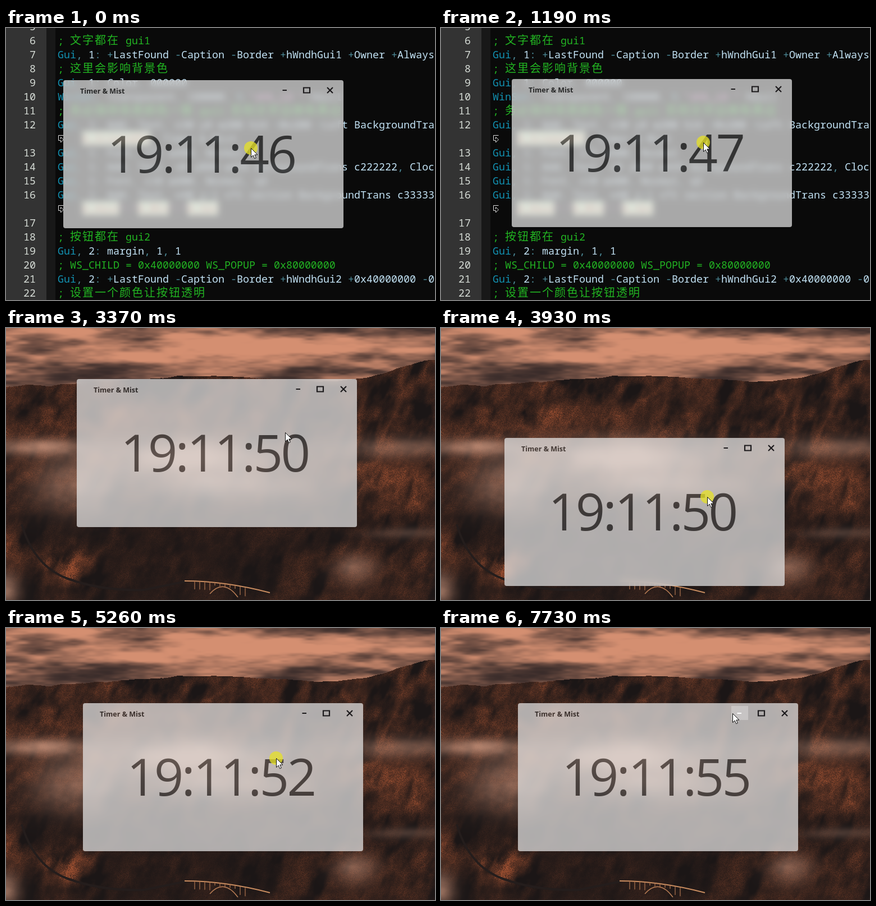
Animation, 764 px wide and 485 px high, one loop 7.99 s. Source, as an HTML page with a canvas:

```html
<!DOCTYPE html>
<html lang="en">
<head>
<meta charset="utf-8">
<title>Timer</title>
<style>
html, body { margin: 0; width: 100%; height: 100%; overflow: hidden; background: #0a0a0a; }
#stage { position: relative; width: 764px; height: 485px; overflow: hidden; }
#stage > * { position: absolute; left: 0; top: 0; }
#editor { width: 764px; height: 485px; overflow: hidden; transform-origin: 50% 100%;
  background: linear-gradient(90deg, #333 72px, #181818 72px 88px, #0a0a0a 88px);
  font: 18.33px/25px "Noto Sans Mono", "DejaVu Sans Mono", monospace; }
#editor div { position: absolute; white-space: pre; height: 25px; }
.num { width: 53px; text-align: right; color: #d6dcd6; }
.row { left: 92px; color: #c2e2f4; }
.note { color: #22b422; }
.cmd { color: #1290b0; }
.op { color: #4d8c9a; }
.str { color: #d070c0; }
.var { color: #c03a30; background: #c8e0bc; }
.cjk { font: 20px/0 "Noto Sans CJK SC", "Noto Sans CJK", sans-serif; letter-spacing: 2px; }
.wrap { position: absolute; left: 92px; }
#win { width: 499px; height: 264px; border-radius: 4px; overflow: hidden;
  backdrop-filter: blur(6px); }
#win svg { display: block; }
#win text { font-family: "Open Sans", "Noto Sans", sans-serif; }
</style>
</head>
<body>
<div id="stage">
  <canvas id="photo" width="764" height="485"></canvas>
  <div id="editor"></div>
  <div id="win">
    <svg width="499" height="264">
      <g opacity=".72">
        <rect width="499" height="264" fill="#e6e6e6"/>
        <text x="30" y="23.5" font-size="12.5" font-weight="700" fill="#303030">Timer &amp; Mist</text>
        <text id="clock" x="78" y="165" font-size="92" letter-spacing="-3.8" fill="#444"></text>
      </g>
      <g class="btn"><rect x="380" y="5" width="30" height="25"/><path d="M390.500 18H398"/></g>
      <g class="btn"><rect x="418" y="5" width="30" height="25"/><path d="M428 13.500H439V22.500H428Z"/></g>
      <g class="btn"><rect x="460" y="5" width="30" height="25"/><path d="M470 13L480 23M480 13L470 23"/></g>
    </svg>
  </div>
  <svg id="cursor" width="48" height="48" viewBox="-24 -24 48 48">
    <circle id="press" r="12" fill="#e6e128" fill-opacity=".76"/>
    <path d="M.5 .5V16.500L4.200 13L6.700 18.700L9.300 17.600L6.800 12H12Z" fill="#fff" stroke="#111"/>
  </svg>
</div>
<script>
const $ = id => document.getElementById(id);
const LOOP = 7990, STEP = 70;
const clamp = u => Math.min(1, Math.max(0, u));
const mix = (a, b, k) => a + (b - a) * k;
const blend = (p, q, k) => p.map((v, i) => mix(v, q[i], k));
const ease = (t, a, b) => {
  const u = clamp((t - a) / (b - a));
  return u * u * (3 - 2 * u);
};

// Editor lines; an indented line is a wrapped one without a number.
const LINES = `
; 文字都在 gui1
Gui, 1: +LastFound -Caption -Border +hWndhGui1 +Owner +AlwaysOnTop
; 这里会影响背景色
Gui, 1: Color, 000000
WinSet, Transparent, 180000, % "ahk_id " hGui1
; 务必保持背景颜色一致 gui1 否则文字边缘有黑边
Gui, 1: Add, Text, x30 y8 w200 h24 +0x200 +Left BackgroundTrans c333333
    A_ScreenDPI, Timer & Mist
Gui, 1: Font, s72 w400, Normal
Gui, 1: Add, Text, x0 y080 w499 BackgroundTrans c222222, Clock
Gui, 1: Font, s10 w400, Normal, q5
Gui, 1: Add, Text, x40 y+1 vTt section BackgroundTrans c333333, %
    A_Hour":"A_Min":"A_Sec

; 按钮都在 gui2
Gui, 2: margin, 1, 1
; WS_CHILD = 0x40000000 WS_POPUP = 0x80000000
Gui, 2: +LastFound -Caption -Border +hWndhGui2 +0x40000000 -0x80000000
; 设置一个颜色让按钮透明`.split('\n');

function add(parent, tag, cls, text = '') {
  const el = parent.appendChild(document.createElement(tag));
  el.className = cls;
  el.textContent = text;
  return el;
}

function kind(part) {
  if (/^[\u4e00-\u9fff]/.test(part)) return 'cjk';
  if (part[0] === '"') return 'str';
  if (part.startsWith('A_')) return 'var';
  if (/^(Gui|WinSet)$/.test(part)) return 'cmd';
  return /^[,:+%-]$/.test(part) ? 'op' : '';
}

let lineNo = 5;
LINES.forEach((text, i) => {
  const top = 25 * i - 16 + 'px';
  const note = text[0] === ';';
  const row = add($('editor'), 'div', note ? 'row note' : 'row');
  row.style.top = top;
  if (text[0] !== ' ') add($('editor'), 'div', 'num', lineNo++).style.top = top;
  else {
    row.insertAdjacentHTML('beforebegin',
      `<svg class="wrap" style="top:${25 * i - 10}px" width="12" height="15" fill="none" stroke="#ddd">
       <path d="M10.500 1.500H1.500V10.500H5.500V14L10.500 9L5.500 4.500V7.500H4.500"/></svg>`);
  }
  const split = note ? /([\u4e00-\u9fff]+)/ : /(".*?"|A_\w+|^\w+|[,:+%-])/;
  text.split(split).forEach(part => part && add(row, 'span', kind(part), part));
});

// Desktop landscape at dusk, shaded from layered noise
function hash(x, y) {
  const s = Math.sin(x * 127.1 + y * 311.7) * 43758.5453;
  return s - Math.floor(s);
}

function noise(x, y) {
  const i = Math.floor(x), j = Math.floor(y);
  const u = ease(x - i, 0, 1), v = ease(y - j, 0, 1);
  return mix(mix(hash(i, j), hash(i + 1, j), u), mix(hash(i, j + 1), hash(i + 1, j + 1), u), v);
}

const fbm = (x, y) =>
  .5 * noise(x, y) + .27 * noise(2 * x + 7, 2 * y) + .15 * noise(4 * x, 4 * y + 5) + .08 * noise(8 * x, 8 * y);

// Soft spots: x, y, x radius, y radius, strength
const MIST = [
  [60, 212, 90, 15, .7], [120, 285, 70, 42, .6], [320, 228, 170, 32, .9], [400, 280, 140, 26, .6],
  [700, 212, 100, 18, .55], [622, 430, 34, 24, .6], [720, 366, 70, 10, .35], [0, 465, 22, 28, .7]
];
const GLOW = [[700, 290, 60, 60, .4], [170, 160, 50, 50, .2], [115, 430, 50, 34, .75], [5, 395, 30, 36, .7]];
const spots = (list, x, y) =>
  list.reduce((sum, [cx, cy, rx, ry, k]) => sum + k * Math.exp(-(((x - cx) / rx) ** 2) - ((y - cy) / ry) ** 2), 0);

function shade(x, y) {
  const fine = fbm(x / 40 + 9, y / 26);
  const ridge = 103 - 18 * Math.exp(-(((x - 360) / 200) ** 2)) - 46 * Math.exp(-(((x - 764) / 110) ** 2)) + 8 * (fine - .5);
  if (y < ridge) {
    const cloud = fbm(x / 120 + 3, y / 26) + .12 * Math.sin(x / 150 - 1) * Math.sin(y / 30);
    return blend([58, 44, 42], [212, 143, 113], ease(cloud, .22, .78));
  }
  const fold = 1 - Math.abs(2 * fbm((x + y * .35) / 42, y / 75) - 1) * 2.4;
  const depth = mix(.52, .2, ease(y, 230, 370)) + .2 * ease(x, 420, 640) * ease(y, 370, 410);
  const glow = spots(GLOW, x, y);
  const grit = .45 + 1.1 * hash(x, y) * fine;
  const land = blend([27, 22, 22], [158, 80, 49], clamp((fold * .55 + fine * .45) * (depth + glow) * grit * 1.35));
  const mist = clamp(spots(MIST, x, y) * (.45 + fbm(x / 70, y / 34)));
  return blend(land, [196, 145, 122], mist * .9);
}

function paintPhoto(c) {
  const { width: w, height: h } = c.canvas;
  const img = c.createImageData(w, h);
  for (let p = 0; p < w * h; p++) img.data.set([...shade(p % w, Math.floor(p / w)), 255], p * 4);
  c.putImageData(img, 0, 0);

  // coast road and bridge
  const stroke = (color, width, d) => {
    c.strokeStyle = color;
    c.lineWidth = width;
    c.stroke(new Path2D(d));
  };
  stroke('#241d1c', 4, 'M28 350Q50 425 110 447T245 467L320 452');
  stroke('#c98d60', 2, 'M318 451Q390 451 470 472');
  stroke('#b87d55', 1.5, 'M363 474Q388 446 413 480');
  for (let x = 336; x < 434; x += 9) {
    const arch = x > 365 && x < 412;
    stroke('#b07650', 1.2, `M${x} ${451 + (x - 330) ** 2 / 750}v${arch ? 6 : 15}`);
  }
}
paintPhoto($('photo').getContext('2d'));

// Each drag circles a center, then eases to rest; the circle points right at time "east".
const DRAGS = [
  { start: 0, grown: 210, decay: 560, rest: 1190, east: 436, turn: 34,
    from: [102, 93], to: [126, 91], center: [129, 123], radius: [54, 47.5], grip: [341, 113] },
  { start: 3440, grown: 3720, decay: 4560, rest: 5120, east: 4350, turn: 19.2,
    from: [126, 91], to: [137, 134], center: [135, 134], radius: [51, 69], grip: [344, 98] }
];
const dragAt = t => DRAGS[t < 3440 ? 0 : 1];

function winAt(t, d = dragAt(t)) {
  const a = (d.east - t) / STEP * d.turn * Math.PI / 180;
  const loop = [d.center[0] + d.radius[0] * Math.cos(a), d.center[1] + d.radius[1] * Math.sin(a)];
  return blend(blend(d.from, loop, ease(t, d.start, d.grown)), d.to, ease(t, d.decay, d.rest));
}

// Free pointer stops: [time, x, y]
const STOPS = [
  [1670, 467, 204], [1950, 800, 20], [2880, 760, 420], [3370, 497, 186], [3440, 467, 190],
  [5390, 481, 232], [6020, 610, 150], [6280, 610, 150], [6770, 504, 153], [6960, 504, 153],
  [7310, 573, 152], [7730, 519, 152]
];

function pointerAt(t, held) {
  if (held) {
    // the window trails the pointer by one step
    const d = dragAt(t);
    return winAt(t + STEP, d).map((v, i) => v + d.grip[i]);
  }
  const i = STOPS.findLastIndex(s => s[0] <= t);
  const [t0, ...p] = STOPS[i], [t1, ...q] = STOPS[i + 1] || [LOOP, ...p];
  return blend(p, q, ease(t, t0, t1));
}

// The picture advances in steps counted from the start of each burst.
const STARTS = [0, 1740, 2280, 2540, 2950, 5460, 6350, 7030];
function snap(t) {
  const s = STARTS.findLast(v => v <= t);
  return s + Math.floor((t - s) / STEP) * STEP;
}

const move = (el, x, y) => { el.style.transform = `translate(${Math.round(x)}px, ${Math.round(y)}px)`; };
const buttons = [...document.querySelectorAll('.btn')];

function draw(now) {
  const t = snap(now % LOOP);
  const held = t < 1740 || (t >= 3440 && t < 5460);
  const [wx, wy] = winAt(t), [px, py] = pointerAt(t, held);
  move($('win'), wx, wy);
  move($('cursor'), px - 24, py - 24);
  $('cursor').style.visibility = t >= 1950 && t < 2950 ? 'hidden' : 'visible';
  $('press').style.visibility = held ? 'inherit' : 'hidden';
  $('clock').textContent = '19:11:' + (49 + Math.floor((t - 2280) / 897));

  const shown = 1 - ease(t, 2470, 2750);
  $('editor').style.opacity = shown;
  $('editor').style.transform = `scale(${mix(.85, 1, shown)})`;

  buttons.forEach(b => {
    const [box, icon] = b.children;
    const x = px - wx - box.getAttribute('x'), y = py - wy - 5;
    const over = t >= 5460 && x >= 0 && x < 30 && y >= 0 && y < 25;
    box.setAttribute('fill', over ? 'rgba(255,255,255,.28)' : 'none');
    icon.setAttribute('fill', 'none');
    icon.setAttribute('stroke', over ? '#fff' : '#1c1a1c');
    icon.setAttribute('stroke-width', 2.2);
  });
}

const begin = performance.now();
function tick() {
  draw(performance.now() - begin);
  requestAnimationFrame(tick);
}
tick();
</script>
</body>
</html>
```
